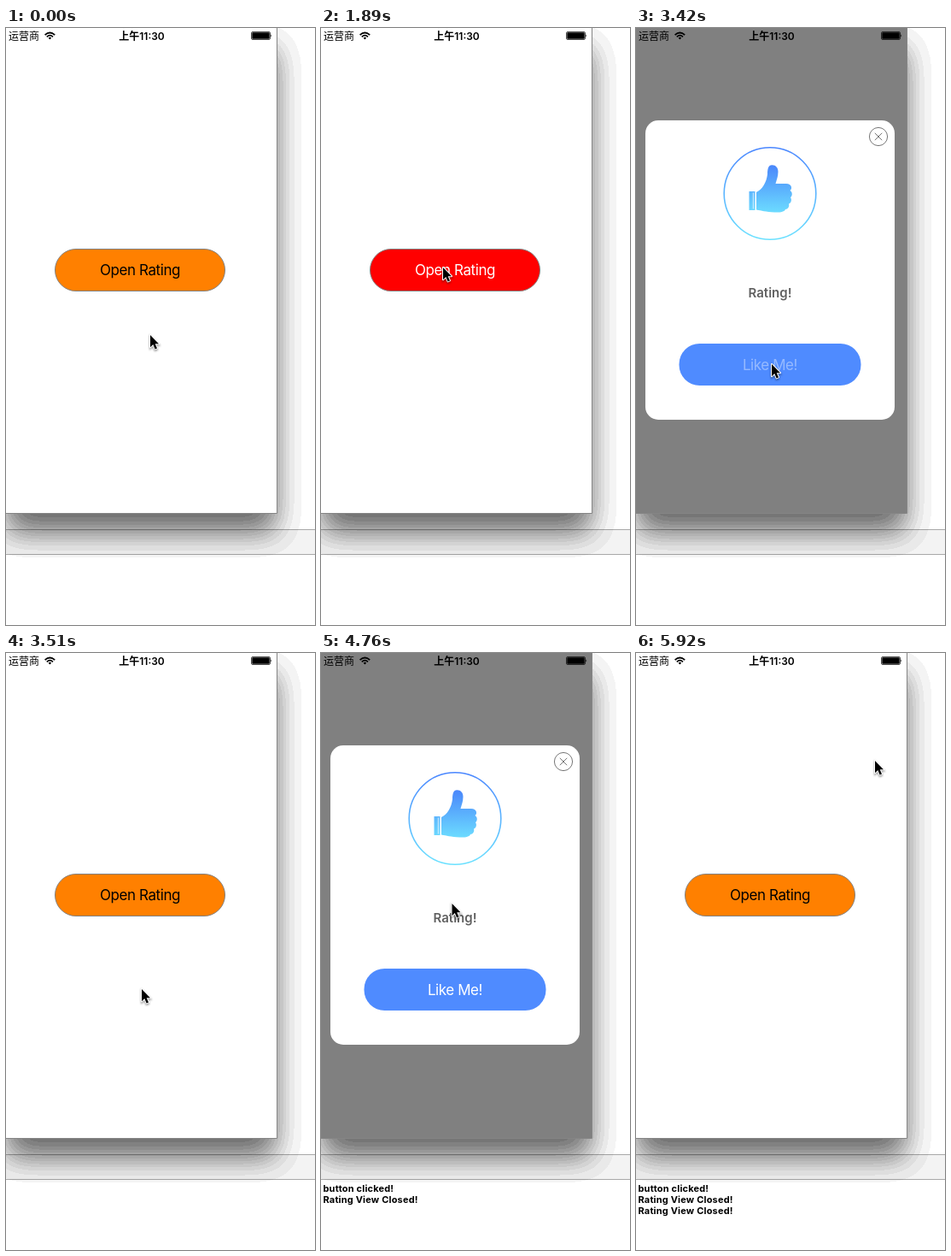
An HTML page that plays this animation: 362x698 px, repeating every 6.02 s.

```html
<!DOCTYPE html>
<html lang="zh-CN">
<head>
<meta charset="utf-8">
<title>Rating popup</title>
<style>
  html, body { margin: 0; width: 100%; height: 100%; overflow: hidden; background: #fff; }
  svg { display: block; }
  text { font-family: Inter, "Noto Sans CJK SC", "Noto Sans CJK", sans-serif; }
  .status { font-size: 12px; }
  .label { font-size: 17px; letter-spacing: -.025em; text-anchor: middle; }
  .log { font: bold 11px "DejaVu Sans Mono", monospace; letter-spacing: .18px; }
</style>
</head>
<body>
<svg width="362" height="698" viewBox="0 0 362 698">
  <defs>
    <filter id="shadow" filterUnits="userSpaceOnUse" x="-70" y="-50" width="460" height="720" color-interpolation-filters="sRGB">
      <feGaussianBlur stdDeviation="17.4"/>
      <feComponentTransfer><feFuncA id="bands" type="discrete"/></feComponentTransfer>
    </filter>
    <filter id="soft" x="-50%" y="-50%" width="200%" height="200%"><feGaussianBlur stdDeviation="1"/></filter>
    <linearGradient id="sky" gradientUnits="userSpaceOnUse" x1="0" y1="139" x2="0" y2="248">
      <stop stop-color="#4a86ff"/><stop offset="1" stop-color="#6ce2ff"/>
    </linearGradient>
    <linearGradient id="hand" gradientUnits="userSpaceOnUse" x1="0" y1="160" x2="0" y2="216">
      <stop stop-color="#4a86fb"/><stop offset="1" stop-color="#6cdcff"/>
    </linearGradient>
    <path id="arrow" d="M0 0V14.2L3.3 11.1L5.6 16.4L8 15.4L5.7 10.2H10Z"/>
  </defs>

  <!-- console bar, window shadow -->
  <rect y="586" width="362" height="30" fill="#f3f3f3"/>
  <path d="M0 586.5H362M0 615.5H362" stroke="#a8a8a8"/>
  <rect y="23" width="317" height="567" filter="url(#shadow)"/>
  <g id="log" class="log">
    <text x="2.5" y="630">button clicked!</text>
    <text x="2.5" y="643">Rating View Closed!</text>
    <text x="2.5" y="656">Rating View Closed!</text>
  </g>

  <!-- phone screen -->
  <path d="M317.5 0V567.5H0" fill="none" stroke="#858585"/>
  <rect id="screen" width="317" height="567"/>
  <text class="status" x="3" y="13.5">运营商</text>
  <text class="status" x="159" y="13.5" text-anchor="middle" font-weight="600">上午11:30</text>
  <g fill="none" stroke="#000" stroke-width="1.7">
    <path d="M45.6 8.2Q51.4 2.8 57.2 8.2M47.8 10.4Q51.4 7 55 10.4"/>
    <path d="M49.6 11.5Q51.4 10 53.2 11.5L51.4 13.4Z" fill="#000" stroke="none"/>
  </g>
  <rect x="287.5" y="4.5" width="22" height="9" rx="1.5" fill="none" stroke="#000" stroke-width=".7"/>
  <rect x="288.3" y="5.3" width="20.4" height="7.4" rx=".8"/>
  <path d="M310.4 7.3Q312 9 310.4 10.7Z"/>

  <g id="opener">
    <rect id="openerBox" x="57.5" y="258.5" width="199" height="49" rx="24.5" stroke="#808080"/>
    <text id="openerText" class="label" x="157" y="289">Open Rating</text>
  </g>

  <g id="popup">
    <rect x="11" y="108" width="292" height="350" rx="15" fill="#fff"/>
    <g fill="none" stroke="#777">
      <circle cx="284" cy="127" r="10.6"/>
      <path d="M279.8 122.8L288.2 131.2M288.2 122.8L279.8 131.2"/>
    </g>
    <circle cx="157" cy="193.5" r="53.8" fill="none" stroke="url(#sky)" stroke-width="1.6"/>
    <g fill="url(#hand)">
      <path d="M132.5 191H139.5V213H132.5Z"/>
      <path d="M141 192C148 189 153 180 154 171C154 165 155 161 158 160.5C163 159.5 166.5 163 166.5 168C166.5 174 164.5 178 163.5 182H176C182.5 182 183.5 188 180.5 190C184 192 183 197 181 198C183 201 181.5 205 179 205.5C180 209 178 212 175 212C174 215 168 216 162 215.5C152 215 147 213.5 141 212.5Z"/>
    </g>
    <path d="M137.3 192.5V211.5" stroke="#fff" stroke-opacity=".75"/>
    <text x="157" y="314.5" font-size="15" font-weight="600" text-anchor="middle" fill="#606060">Rating!</text>
    <rect x="50.5" y="369" width="213" height="49" rx="24" fill="#4f8bff"/>
    <text id="likeText" class="label" x="157" y="399.5" fill="#fff">Like Me!</text>
  </g>

  <g id="cursor">
    <use href="#arrow" y="1.5" stroke="#000" stroke-width="2" opacity=".4" filter="url(#soft)"/>
    <use href="#arrow" stroke="#fff" stroke-width="2" stroke-linejoin="round"/>
    <use href="#arrow"/>
  </g>
</svg>
<script>
  const LOOP = 6020;
  const $ = id => document.getElementById(id);
  const show = (node, on) => node.setAttribute("visibility", on ? "visible" : "hidden");

  $("bands").setAttribute("tableValues",
    Array.from({ length: 27 }, (_, k) => (0.045 * Math.ceil(k / 2)).toFixed(3)).join(" "));

  // [time, x, y] of the pointer tip; it jumps between positions
  const pointer = [
    [0, 169, 359], [1080, 141, 354], [1170, 124.5, 356],
    [1440, 131, 311], [1530, 143, 280],
    [2700, 151, 346], [2790, 159, 393],
    [4130, 161, 383], [4220, 163, 358], [4310, 159, 322], [4400, 151.5, 298], [4490, 153.5, 293],
    [4940, 186, 230], [5030, 233, 173],
    [5210, 251, 158], [5300, 266, 142], [5390, 276, 131], [5480, 280, 126]
  ];
  const logTimes = [3590, 3590, 5920];
  const within = (t, from, to) => t >= from && t < to;

  function draw(t) {
    const open = within(t, 2070, 3510) || within(t, 4760, 5840);
    const pressed = within(t, 1890, 2070) || within(t, 4670, 4760);
    const [, x, y] = pointer.findLast(step => step[0] <= t);

    $("screen").setAttribute("fill", open ? "#808080" : "#fff");
    show($("opener"), !open);
    show($("popup"), open);
    $("openerBox").setAttribute("fill", pressed ? "#f00" : "#ff8000");
    $("openerText").setAttribute("fill", pressed ? "#fff" : "#000");
    $("likeText").setAttribute("opacity", within(t, 3420, 3510) ? 0.4 : 1);
    [...$("log").children].forEach((line, i) => show(line, t >= logTimes[i]));
    $("cursor").setAttribute("transform", `translate(${x} ${y})`);
  }

  const start = performance.now();
  function tick() {
    draw((performance.now() - start) % LOOP);
    requestAnimationFrame(tick);
  }
  tick();
</script>
</body>
</html>
```
